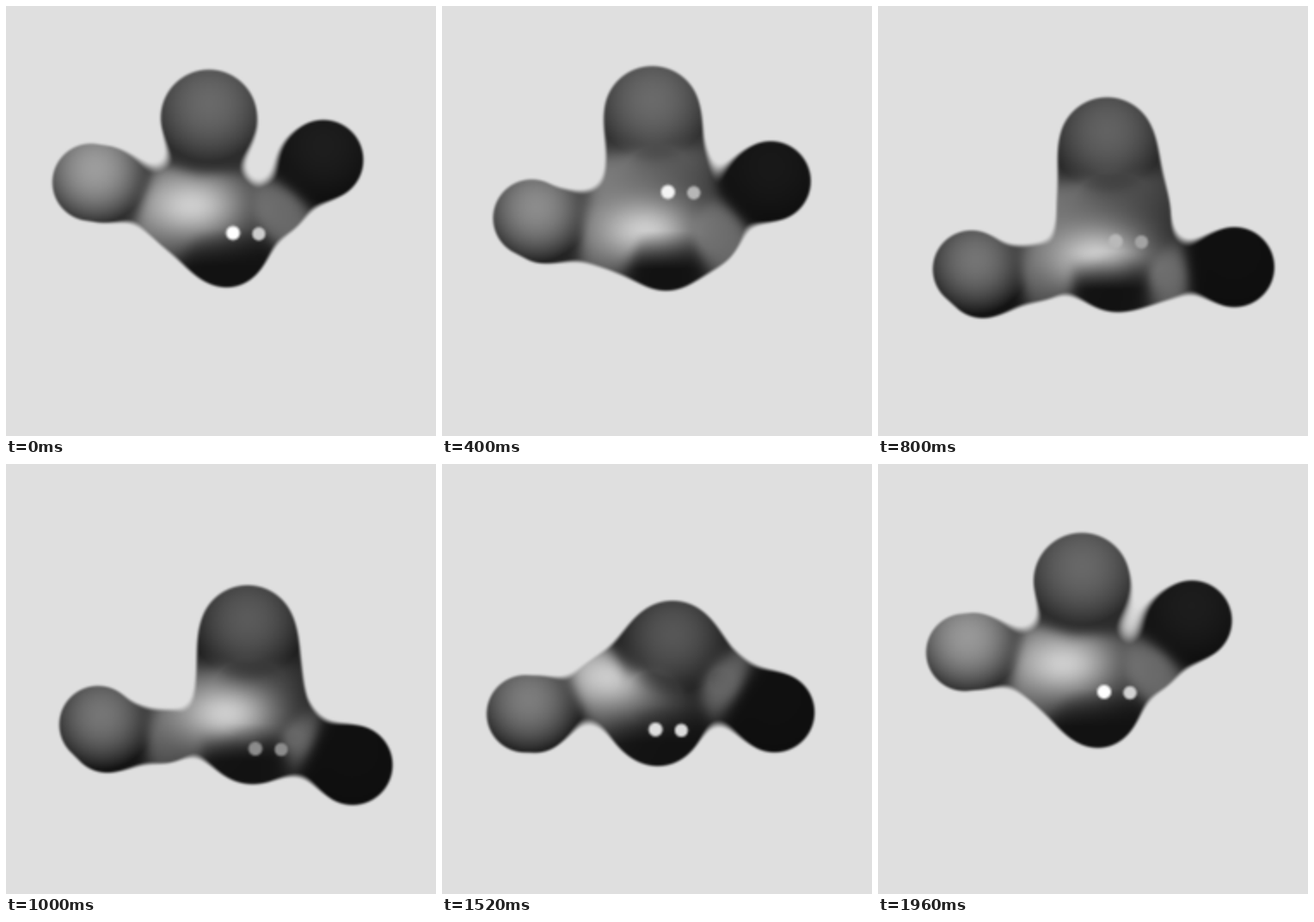
An HTML page with a canvas for the animation above (2000 ms loop, 500x500 px).

```html
<!DOCTYPE html>
<html lang="en">
<head>
<meta charset="utf-8">
<title>Blob</title>
<style>
html, body { margin: 0; width: 100%; height: 100%; overflow: hidden; background: #dfdfdf; }
canvas { display: block; width: 500px; height: 500px; }
</style>
</head>
<body>
<canvas id="stage" width="250" height="250"></canvas>
<script>
const LOOP = 2000, STEP = 40, SIZE = 250, SCALE = 500 / SIZE, BACK = 223;
const ctx = document.getElementById('stage').getContext('2d');
const image = ctx.createImageData(SIZE, SIZE);
const pixels = image.data;

const TIMES = [0, 240, 560, 1000, 1320, 1680, 1960];

// Periodic smooth curve through rows of values.
function track(rows, times = TIMES) {
  const n = rows.length;
  const time = i => times[(i + n) % n] + LOOP * Math.floor(i / n);
  const value = (i, c) => rows[(i + n) % n][c];
  const rate = (i, c) => (value(i + 1, c) - value(i, c)) / (time(i + 1) - time(i));
  const slope = (i, c) => {
    const before = time(i) - time(i - 1), after = time(i + 1) - time(i);
    return (rate(i - 1, c) * after + rate(i, c) * before) / (before + after);
  };
  return t => {
    let i = n - 1;
    while (times[i] > t) i--;
    const span = time(i + 1) - time(i), u = (t - time(i)) / span, v = 1 - u;
    return rows[0].map((_, c) =>
      value(i, c) * (1 + 2 * u) * v * v + value(i + 1, c) * u * u * (3 - 2 * u) +
      span * u * v * (slope(i, c) * v - slope(i + 1, c) * u));
  };
}

// x, y of the outer balls; the left one is a short capsule.
const head = track([[236, 130], [240, 130], [251, 127], [281, 197], [302, 231], [240, 190], [237, 136]]);
const left = track([[99, 205, 112, 207], [100, 202, 113, 207], [109, 296, 125, 306], [107, 303, 118, 314],
  [106, 325, 119, 327], [92, 256, 101, 256], [101, 219, 111, 218]]);
const right = track([[369, 179], [380, 194], [388, 226], [414, 298], [403, 350], [401, 360], [395, 342], [379, 241], [365, 182]],
  [0, 240, 560, 780, 1000, 1100, 1320, 1680, 1960]);
const foot = track([[257, 283], [260, 286], [263, 289], [285, 326], [272, 326], [241, 289], [256, 286]]);

// x, y, radius of the inner balls.
const coreLeft = track([[200, 238, 42], [200, 246, 46], [195, 283, 32], [190, 318, 28], [195, 270, 28], [185, 250, 34], [201, 238, 42]]);
const coreRight = track([[318, 238, 26], [306, 246, 32], [328, 288, 28], [335, 318, 22], [342, 282, 25], [311, 234, 30], [317, 238, 26]]);
const coreMid = track([[245, 235, 38], [250, 213, 50], [254, 205, 64], [284, 272, 62], [255, 255, 42], [242, 280, 52], [245, 237, 38]]);

const glow = track([[215, 232], [228, 243], [242, 280], [255, 290], [225, 262], [180, 238], [215, 232]]);

// x, y, brightness of each eye.
const eyes = track([[264, 264, 255, 205], [269.5, 242, 230, 170], [257, 203, 255, 200], [290, 331, 140, 140],
  [271, 308, 215, 200], [238, 305, 225, 225], [263, 265, 255, 210]]);

const clamp = (v, lo, hi) => Math.max(lo, Math.min(hi, v));

function join(a, b) {
  const h = Math.max(50 - Math.abs(a - b), 0) / 50;
  return Math.min(a, b) - h * h * 12.5;
}

function ball(x, y, [cx, cy, radius]) {
  return Math.sqrt((x - cx) ** 2 + (y - cy) ** 2) - radius;
}

function capsule(x, y, [ax, ay, bx, by], radius) {
  const dx = bx - ax, dy = by - ay;
  const u = clamp(((x - ax) * dx + (y - ay) * dy) / (dx * dx + dy * dy + 1e-6), 0, 1);
  return Math.sqrt((x - ax - dx * u) ** 2 + (y - ay - dy * u) ** 2) - radius;
}

function sheen(x, y, cx, cy, reach, low, high) {
  const d2 = ((x - cx) ** 2 + (y - cy + 17) ** 2) / (reach * reach);
  return low + (high - low) * Math.max(0, 1 - d2);
}

const weight = d => Math.exp(-clamp(d, -26, 120) / 8);

function drawBlob(t) {
  const H = [...head(t), 56], L = left(t), R = [...right(t), 46.5], F = [...foot(t), 44];
  const A = coreLeft(t), B = coreRight(t), M = coreMid(t), [gx, gy] = glow(t);
  const lx = (L[0] * 2 + L[2]) / 3, ly = (L[1] + L[3]) / 2;
  const leftHigh = 157 - 0.38 * (ly - 205), leftLow = 45 - 0.25 * (ly - 205);
  const headHigh = 105 - 0.22 * (H[1] - 130), headLow = 44 - 0.25 * (H[1] - 130);
  const rightHigh = Math.max(16, 31 - 0.2 * (R[1] - 170));

  for (let j = 0, k = 0; j < SIZE; j++) {
    const y = (j + 0.5) * SCALE;
    for (let i = 0; i < SIZE; i++, k += 4) {
      const x = (i + 0.5) * SCALE;
      const dH = ball(x, y, H), dL = capsule(x, y, L, 45), dR = ball(x, y, R), dF = ball(x, y, F);
      const dA = ball(x, y, A), dB = ball(x, y, B), dM = ball(x, y, M);
      const d = [dB, dM, dF, dH, dL, dR].reduce(join, dA);
      let shade = BACK;
      if (d < 2.5) {
        const base = clamp(72 - 0.45 * (x - 250) - 0.4 * (y - gy), 20, 135);
        const lit = Math.exp(-(((x - gx) / 60) ** 2) - ((y - gy) / 38) ** 2);
        const body = base + (205 - base) * lit;
        const under = 18 + (body - 18) * clamp((F[1] + 20 - y) / 45, 0, 1);
        const parts = [
          [dH - 6, sheen(x, y, H[0], H[1], 68, headLow, headHigh)],
          [dL - 4, sheen(x, y, lx, ly, 64, leftLow, leftHigh)],
          [dR - 6, sheen(x, y, R[0], R[1], 64, 14, rightHigh)],
          [dF, under],
          [Math.max(dA, -15), body],
          [Math.max(dB, -15), 105 + 60 * lit],
          [Math.max(dM, -15), body]
        ];
        let sum = 0, total = 0;
        for (const [dist, tone] of parts) {
          const w = weight(dist);
          sum += w * tone;
          total += w;
        }
        const u = clamp((2.5 - d) / 5, 0, 1), cover = u * u * (3 - 2 * u);
        shade += (sum / total - BACK) * cover;
      }
      pixels[k] = pixels[k + 1] = pixels[k + 2] = shade;
      pixels[k + 3] = 255;
    }
  }
  ctx.putImageData(image, 0, 0);
}

function drawEye(x, y, radius, tone) {
  const v = Math.round(clamp(tone, 0, 255));
  const fill = ctx.createRadialGradient(x, y, 0, x, y, radius + 2);
  fill.addColorStop(0, `rgb(${v},${v},${v})`);
  fill.addColorStop(0.6, `rgb(${v},${v},${v})`);
  fill.addColorStop(1, `rgba(${v},${v},${v},0)`);
  ctx.fillStyle = fill;
  ctx.beginPath();
  ctx.arc(x, y, radius + 2, 0, Math.PI * 2);
  ctx.fill();
}

function draw(t) {
  drawBlob(t);
  const [x, y, first, second] = eyes(t);
  ctx.save();
  ctx.scale(1 / SCALE, 1 / SCALE);
  drawEye(x, y, 8, first);
  drawEye(x + 30, y + 1, 7.5, second);
  ctx.restore();
}

let shown = -1;
function tick() {
  const t = Math.floor(performance.now() % LOOP / STEP) * STEP;
  if (t !== shown) draw(shown = t);
  requestAnimationFrame(tick);
}
tick();
</script>
</body>
</html>
```
